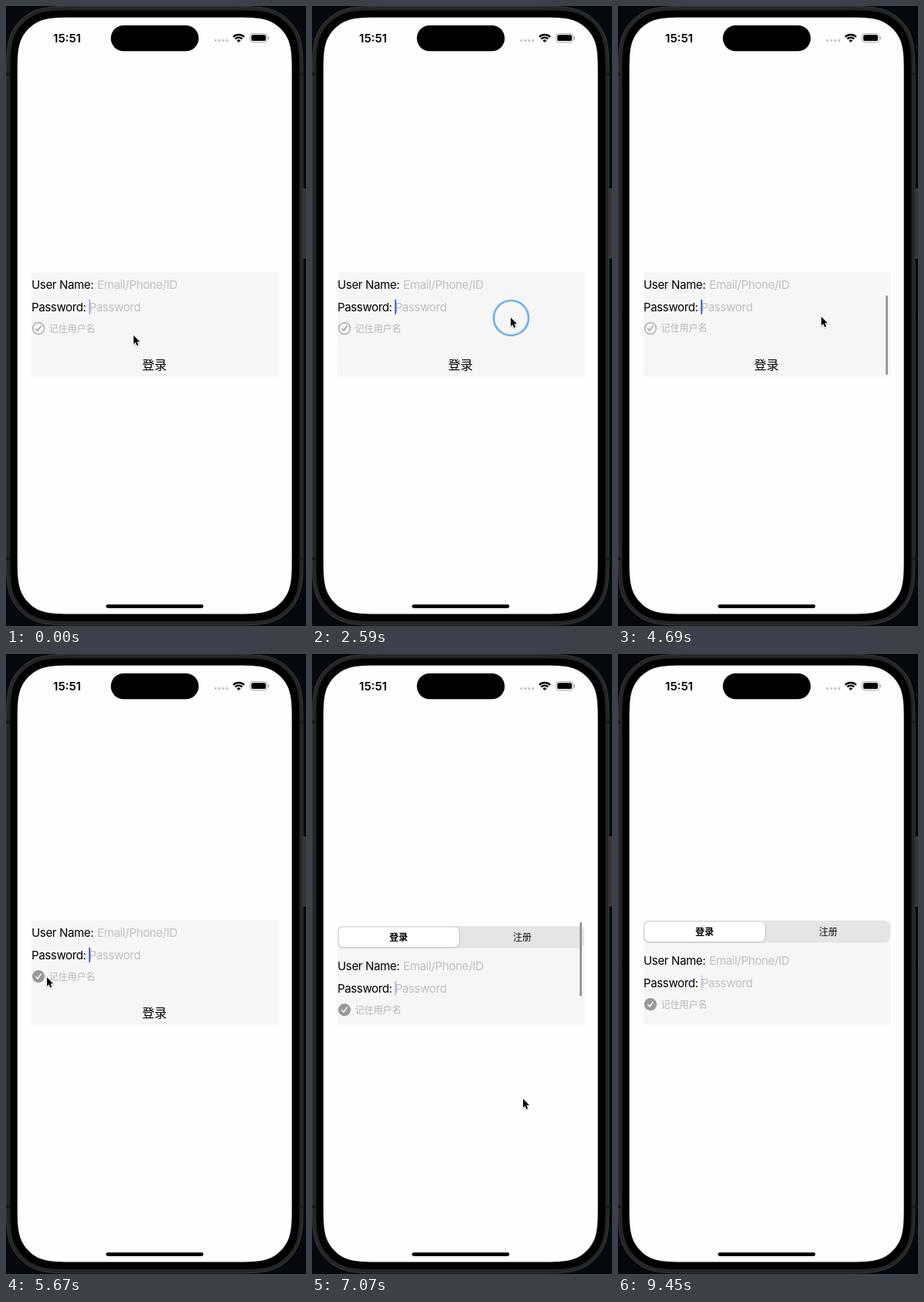
An HTML page with a canvas that plays this animation: 388 by 800 pixels, repeating every 9.52 s.

```html
<!DOCTYPE html>
<html lang="zh">
<head>
<meta charset="utf-8">
<title>Login form</title>
<style>
  html, body { margin: 0; width: 100%; height: 100%; overflow: hidden; background: #05080c; }
  canvas { display: block; width: 388px; height: 800px; }
</style>
</head>
<body>
<canvas id="stage"></canvas>
<script>
const W = 388, H = 800, LOOP = 9520, STEP = 70;
const VIEW = { x: 33, y: 344, w: 320, h: 134 };
const CONTENT = 170, MAX = CONTENT - VIEW.h;
const LATIN = 'Inter, "Noto Sans", sans-serif';
const CJK = '"Noto Sans CJK SC", "Noto Sans CJK", sans-serif';

const canvas = document.getElementById('stage');
const ctx = canvas.getContext('2d');
const dpr = window.devicePixelRatio || 1;
canvas.width = W * dpr;
canvas.height = H * dpr;

// pointer path: time, x, y
const path = [
  [0, 165, 425], [350, 165, 425], [1250, 246, 412], [1750, 262, 400], [2350, 257, 402], [2600, 257, 402],
  [2920, 257, 370], [3050, 257, 370], [3310, 255, 452], [3380, 255, 452], [3640, 255, 429.5],
  [3900, 258, 402], [4200, 262, 401], [4760, 263, 401], [5320, 42, 416], [5600, 42, 416],
  [6120, 264, 440], [6230, 264, 440], [6510, 268, 489.5], [6760, 273, 574], [7210, 273, 574],
  [7770, 300, 806]
];
const drags = [[2450, 3010], [3360, 3930], [6210, 6780]];
const CLICK = [5390, 5530];
const CHECKED_AT = 5460;

const clamp = (v, a, b) => Math.min(b, Math.max(a, v));

// monotone cubic interpolation through the path points
function along(t, axis) {
  const last = path.length - 1;
  if (t >= path[last][0]) return path[last][axis];
  let i = 0;
  while (t >= path[i + 1][0]) i++;
  const slope = k => k < 0 || k >= last ? 0 :
    (path[k + 1][axis] - path[k][axis]) / (path[k + 1][0] - path[k][0]);
  const tangent = k => {
    const a = slope(k - 1), b = slope(k);
    return a * b <= 0 ? 0 : 2 * a * b / (a + b);
  };
  const d = path[i + 1][0] - path[i][0], u = (t - path[i][0]) / d, v = 1 - u;
  return path[i][axis] * (1 + 2 * u) * v * v + tangent(i) * d * u * v * v +
    path[i + 1][axis] * u * u * (3 - 2 * u) - tangent(i + 1) * d * u * u * v;
}

function rubber(s) {
  const edge = clamp(s, 0, MAX), over = Math.abs(s - edge);
  return edge + Math.sign(s - edge) * VIEW.h * (1 - 1 / (over * 0.55 / VIEW.h + 1));
}

function scrollAt(t) {
  let s = MAX;
  for (const [from, to] of drags) {
    if (t < from) break;
    s = rubber(s + along(from, 2) - along(Math.min(t, to), 2));
    if (t > to) {
      const rest = clamp(s, 0, MAX), k = (t - to) * 0.0107;
      s = rest + (s - rest) * (1 + k) * Math.exp(-k);
    }
  }
  return s;
}

function barAlpha(t) {
  let a = 0;
  for (const [from, to] of drags) {
    if (t > from + 200) a = clamp((to + 1050 - t) / 250, 0, 1);
  }
  return a;
}

function caretAlpha(t) {
  if (t < 350) t += LOOP;
  const p = ((t - 8050) % 1050 + 1050) % 1050;
  return p < 280 ? clamp(1 - (p + 70) / 210, 0, 1) : clamp((p - 280) / 350, 0, 1);
}

function paint(fill, stroke, line = 1) {
  if (fill) { ctx.fillStyle = fill; ctx.fill(); }
  if (stroke) { ctx.strokeStyle = stroke; ctx.lineWidth = line; ctx.stroke(); }
}

function box(x, y, w, h, r, ...style) {
  ctx.beginPath();
  ctx.roundRect(x, y, w, h, r);
  paint(...style);
}

// rounded box whose corners ease gradually into the sides
function smoothBox(x, y, w, h, r, ...style) {
  ctx.beginPath();
  const corner = (cx, cy, ax, ay, bx, by) => {
    const at = (a, b) => [cx + (ax * a + bx * b) * r, cy + (ay * a + by * b) * r];
    ctx.lineTo(...at(1.529, 0));
    ctx.bezierCurveTo(...at(1.088, 0), ...at(0.868, 0), ...at(0.631, 0.075));
    ctx.bezierCurveTo(...at(0.373, 0.169), ...at(0.169, 0.373), ...at(0.075, 0.631));
    ctx.bezierCurveTo(...at(0, 0.868), ...at(0, 1.088), ...at(0, 1.529));
  };
  corner(x, y, 0, 1, 1, 0);
  corner(x + w, y, -1, 0, 0, 1);
  corner(x + w, y + h, 0, -1, -1, 0);
  corner(x, y + h, 1, 0, 0, -1);
  ctx.closePath();
  paint(...style);
}

function disc(x, y, r, ...style) {
  box(x - r, y - r, 2 * r, 2 * r, r, ...style);
}

function text(str, x, y, font, color, align = 'left', spacing = 0) {
  ctx.font = font;
  ctx.fillStyle = color;
  ctx.textAlign = align;
  ctx.letterSpacing = spacing + 'px';
  ctx.fillText(str, x, y);
}

function drawPhone() {
  ctx.fillStyle = '#05080c';
  ctx.fillRect(0, 0, W, H);
  box(382, 236, 8, 89, 2, '#353535', '#484848');
  smoothBox(0.5, 0.5, 383.5, 798.5, 62, '#252526', '#3a3a3b');
  smoothBox(5.5, 5.5, 374, 788.5, 57, '#000');
  ctx.fillStyle = '#1a1a1a';
  for (const y of [86, 711]) {
    ctx.fillRect(0, y, 5, 4);
    ctx.fillRect(380, y, 4, 4);
  }
  smoothBox(14.7, 14.7, 355, 769.8, 49.7, '#fefefe');
  box(135.6, 25, 113.6, 33.3, 16.6, '#000');
  box(129.3, 772.3, 126, 4.6, 2.3, '#000');
}

function drawStatus() {
  text('15:51', 79, 46.5, '600 15px ' + LATIN, '#000', 'center');
  for (let i = 0; i < 4; i++) disc(271 + i * 5, 44.5, 1.7, '#c8c8c8');

  ctx.strokeStyle = '#000';
  ctx.lineWidth = 2.3;
  for (const r of [6.4, 10]) {
    ctx.beginPath();
    ctx.arc(301, 47, r, -Math.PI * 0.75, -Math.PI * 0.25);
    ctx.stroke();
  }
  ctx.fillStyle = '#000';
  ctx.beginPath();
  ctx.moveTo(301, 47);
  ctx.arc(301, 47, 3.6, -Math.PI * 0.75, -Math.PI * 0.25);
  ctx.fill();

  box(315.7, 35.7, 22, 11, 3.5, null, '#a5a5a5');
  box(317.3, 37.3, 18.8, 7.8, 2.2, '#000');
  box(338.9, 39.2, 1.3, 4, 0.7, '#a5a5a5');
}

function drawCheck(y, on) {
  disc(42, y, 7.4, on ? '#999' : null, on ? '#999' : '#a3a3a3', 1.3);
  ctx.strokeStyle = on ? '#fff' : '#9c9c9c';
  ctx.lineWidth = 1.4;
  ctx.lineCap = ctx.lineJoin = 'round';
  ctx.beginPath();
  ctx.moveTo(38.8, y + 0.6);
  ctx.lineTo(41, y + 3);
  ctx.lineTo(45.2, y - 3);
  ctx.stroke();
  ctx.lineCap = 'butt';
}

function drawSegments(top) {
  box(33, top, 319, 28.5, 7, '#e5e5e5');
  ctx.save();
  ctx.shadowColor = 'rgba(0,0,0,.25)';
  ctx.shadowBlur = 3 * dpr;
  ctx.shadowOffsetY = 0.5 * dpr;
  box(34.5, top + 1.5, 155.5, 25.5, 6, '#fff');
  ctx.restore();
  text('登录', 112, top + 18.5, '700 12px ' + CJK, '#000', 'center');
  text('注册', 272, top + 18.5, '500 12px ' + CJK, '#111', 'center');
}

function drawForm(t) {
  const s = scrollAt(t), top = VIEW.y - s;
  const label = '400 15px ' + LATIN, hint = '#c0c0c2';
  ctx.save();
  ctx.beginPath();
  ctx.rect(VIEW.x, VIEW.y - 0.5, VIEW.w, VIEW.h + 0.5);
  ctx.clip();
  ctx.fillStyle = '#f6f6f6';
  ctx.fillRect(VIEW.x, top, VIEW.w, CONTENT);

  drawSegments(top);
  text('User Name:', 33, top + 57, label, '#000', 'left', -0.35);
  text('Email/Phone/ID', 118, top + 57, label, hint, 'left', -0.35);
  text('Password:', 33, top + 86, label, '#000', 'left', -0.35);
  text('Password', 107.5, top + 86, label, hint, 'left', -0.35);
  ctx.globalAlpha = caretAlpha(t);
  box(107, top + 70.5, 2.1, 19.5, 1, '#456be8');
  ctx.globalAlpha = 1;

  drawCheck(top + 108, t >= CHECKED_AT);
  text('记住用户名', 55.5, top + 112.5, '400 12px ' + CJK, '#b6b6b6');
  text('登录', 192, top + 161, '400 16px ' + CJK, '#000', 'center');

  const over = Math.abs(s - clamp(s, 0, MAX));
  const track = VIEW.h - 4, full = track * VIEW.h / CONTENT;
  const barY = VIEW.y + 2 + clamp(s / MAX, 0, 1) * (track - full) + (s > MAX ? over : 0);
  ctx.globalAlpha = barAlpha(t);
  box(346.3, barY, 2.7, Math.max(8, full - over), 1.35, '#929292');
  ctx.restore();
}

function drawPointer(t) {
  const x = along(t, 1), y = along(t, 2);
  if (y > H) return;
  if ([...drags, CLICK].some(([a, b]) => t >= a && t < b)) {
    disc(x + 0.5, y + 0.5, 22.5, null, '#70b0f3', 2.7);
  }
  ctx.save();
  ctx.translate(x, y);
  ctx.scale(0.9, 0.9);
  ctx.beginPath();
  ctx.moveTo(0, 0);
  ctx.lineTo(0, 12.6);
  ctx.lineTo(2.8, 10);
  ctx.lineTo(4.8, 14.6);
  ctx.lineTo(6.9, 13.7);
  ctx.lineTo(5, 9.2);
  ctx.lineTo(8.8, 9);
  ctx.closePath();
  ctx.lineJoin = 'round';
  ctx.shadowColor = 'rgba(0,0,0,.25)';
  ctx.shadowBlur = 2 * dpr;
  ctx.shadowOffsetY = dpr;
  paint(null, '#fff', 1.6);
  ctx.shadowColor = 'transparent';
  paint('#000');
  ctx.restore();
}

function draw(now) {
  const t = Math.floor((now % LOOP) / STEP) * STEP;
  ctx.setTransform(dpr, 0, 0, dpr, 0, 0);
  drawPhone();
  drawStatus();
  drawForm(t);
  drawPointer(t);
}

const start = performance.now();
function tick() {
  draw(performance.now() - start);
  requestAnimationFrame(tick);
}
tick();
</script>
</body>
</html>
```
